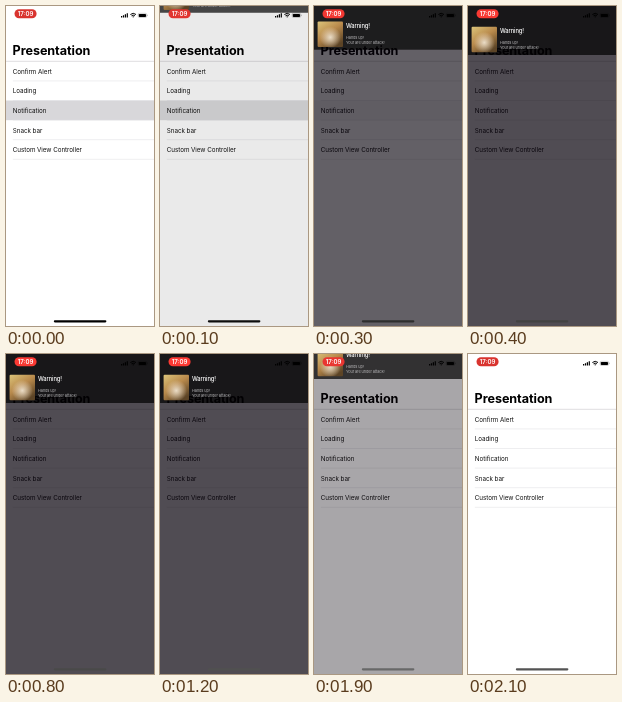
Recreate the animation shown at these times as an HTML page. Size 148 by 320 pixels, loop 2200 ms.

```html
<!DOCTYPE html>
<html lang="en">
<head>
<meta charset="utf-8">
<title>Presentation</title>
<style>
  html, body { margin: 0; width: 100%; height: 100%; overflow: hidden; background: #fff; }
  svg { display: block; width: 148px; height: 320px; }
  text { font-family: Inter, "Liberation Sans", sans-serif; }
  .title { font-size: 12.6px; font-weight: 700; letter-spacing: -.06px; }
  .row { font-size: 6.3px; letter-spacing: -.06px; fill: #111; }
  .clock { font-size: 6.1px; font-weight: 600; fill: #fff; text-anchor: middle; }
  .head { font-size: 5.8px; font-weight: 500; letter-spacing: -.1px; fill: #fff; }
  .note { font-size: 3.9px; letter-spacing: -.1px; fill: #b4b3b5; }
</style>
</head>
<body>
<svg viewBox="0 0 148 320">
  <defs>
    <linearGradient id="tan" x2=".7" y2="1">
      <stop offset="0" stop-color="#dcc47a"/>
      <stop offset=".5" stop-color="#b98a4c"/>
      <stop offset="1" stop-color="#5c4426"/>
    </linearGradient>
    <radialGradient id="glow" cx=".5" cy=".62" r=".42">
      <stop offset="0" stop-color="#eadcc6"/>
      <stop offset="1" stop-color="#eadcc6" stop-opacity="0"/>
    </radialGradient>
  </defs>
  <rect width="148" height="320" fill="#fff"/>
  <rect id="pick" y="94.5" width="148" height="19.7" fill="#d8d7da"/>
  <text class="title" x="6.6" y="49.3">Presentation</text>
  <path d="M0 55.3H148" stroke="#c8c7cb" stroke-width=".6"/>
  <g id="list"></g>
  <rect id="dim" width="148" height="320" fill="#06000a"/>
  <g id="banner">
    <rect y="-10" width="148" height="59" fill="#000" opacity=".7"/>
    <g transform="translate(3.6 20.8)">
      <rect width="25.4" height="25.4" rx="1" fill="url(#tan)"/>
      <rect width="25.4" height="25.4" rx="1" fill="url(#glow)"/>
    </g>
    <text class="head" x="31.9" y="27.2">Warning!</text>
    <text class="note" x="32" y="38.4">Hands up!</text>
    <text class="note" x="32" y="42.8">Your are under attack!</text>
  </g>
  <rect id="pill" x="8.5" y="3.3" width="22.1" height="9" rx="4.5"/>
  <text class="clock" x="19.5" y="10">17:09</text>
  <g id="status">
    <path d="M115.6 11.4v-1.5M117.5 11.4v-2.2M119.4 11.4v-3.1M121.3 11.4v-4.1" stroke="#000" stroke-width="1.2"/>
    <g fill="none" stroke="#000" stroke-width="1">
      <path d="M124.4 8.5q2.8-2.4 5.6 0M125.5 9.8q1.7-1.4 3.4 0"/>
      <path d="M127.2 10.2v1.2"/>
    </g>
    <rect x="132.2" y="7.3" width="8.4" height="4.2" rx="1.2" fill="none" stroke="#000" stroke-opacity=".45" stroke-width=".4"/>
    <rect x="132.8" y="7.9" width="7.2" height="3" rx=".7"/>
    <path d="M141.3 8.7v1.4" stroke="#000" stroke-opacity=".5" stroke-width=".5"/>
  </g>
  <rect id="home" x="47.8" y="314.2" width="52.6" height="2.2" rx="1.1"/>
</svg>
<script>
const LOOP = 2200, STEP = 100;
const $ = id => document.getElementById(id);

// Each track is a list of [time, value] pairs.
const tracks = {
  shown: [[0, 0], [100, .12], [200, .5], [300, .89], [400, 1], [1700, 1], [1800, .88], [1900, .5], [2000, .11], [2100, 0]],
  pick: [[0, 1], [100, .9], [200, .55], [300, .2], [400, 0]],
  glow: [[0, 0], [200, .45], [400, .9], [1200, 1], [1700, 1], [1900, .45], [2100, 0]],
  home: [[0, 0], [200, 26], [400, 66], [1200, 80], [1700, 116], [1900, 104], [2100, 84]]
};

function at(track, t) {
  const i = track.findIndex(([time]) => time > t);
  if (i < 0) return track[track.length - 1][1];
  const [t0, a] = track[i - 1], [t1, b] = track[i];
  return a + (b - a) * (t - t0) / (t1 - t0);
}

const rows = ["Confirm Alert", "Loading", "Notification", "Snack bar", "Custom View Controller"];
$("list").innerHTML = rows.map((label, i) => {
  const y = 55.3 + i * 19.6;
  return `<text class="row" x="6.8" y="${y + 12.4}">${label}</text>
    <path d="M6.8 ${y + 19.6}H148" stroke="#dddce0" stroke-width=".5"/>`;
}).join("");

function draw(now) {
  const t = Math.floor(now % LOOP / STEP) * STEP;
  const shown = at(tracks.shown, t), glow = at(tracks.glow, t), grey = at(tracks.home, t);
  $("dim").setAttribute("opacity", .7 * shown);
  $("banner").setAttribute("transform", `translate(0 ${-48 * (1 - shown)})`);
  $("banner").setAttribute("visibility", shown ? "visible" : "hidden");
  $("pick").setAttribute("opacity", at(tracks.pick, t));
  $("pill").setAttribute("fill", `rgb(${217 + 35 * glow},${52 + 5 * glow},${47 + 4 * glow})`);
  $("home").setAttribute("fill", `rgb(${grey},${grey},${grey})`);
}

const start = performance.now();
function tick() {
  draw(performance.now() - start);
  requestAnimationFrame(tick);
}
tick();
</script>
</body>
</html>
```
